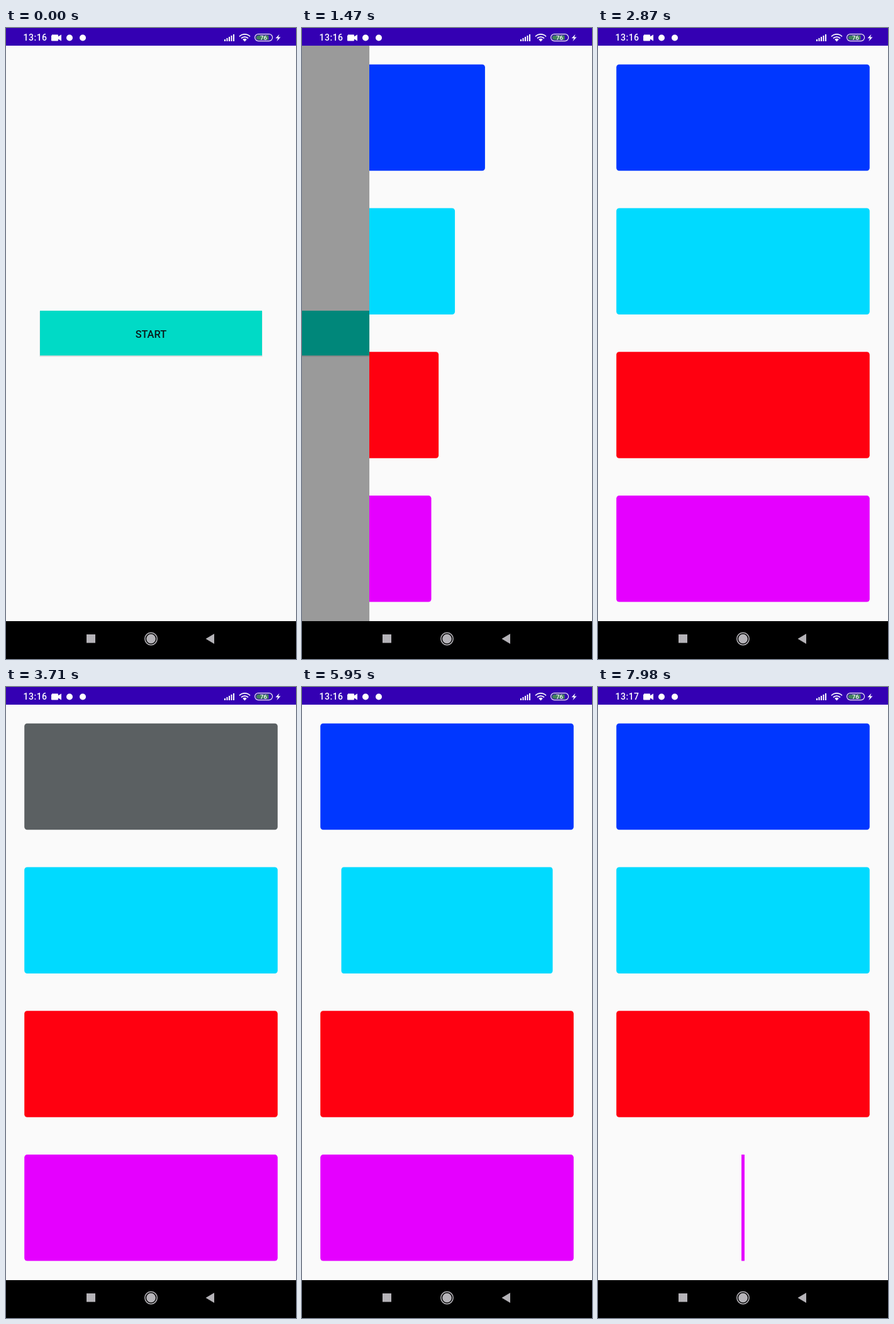
An HTML page for the animation above (8 s loop, 461 by 1000 pixels).

```html
<!DOCTYPE html>
<html lang="en">
<head>
<meta charset="utf-8">
<title>Card flip</title>
<style>
  html, body { margin: 0; width: 100%; height: 100%; overflow: hidden; background: #fafafa; }
  svg { display: block; overflow: hidden; font-family: Roboto, sans-serif; }
</style>
</head>
<body>
<svg width="461" height="1000" viewBox="0 0 461 1000">
  <g id="home">
    <rect width="461" height="1000" fill="#fafafa"/>
    <rect x="53.5" y="449" width="354" height="72" fill="#000" opacity=".12"/>
    <rect x="54" y="448" width="353" height="71" fill="#00dac6"/>
    <text x="230.5" y="491" font-size="16.4" font-weight="500" text-anchor="middle" fill="#0a1a1a">START</text>
  </g>
  <rect id="dim" y="28" width="461" height="912"/>
  <svg id="page" width="461" height="1000"><rect width="461" height="1000" fill="#fafafa"/></svg>

  <rect width="461" height="28" fill="#3400b3"/>
  <g fill="#fff">
    <text id="clock" x="27.5" y="20.3" font-size="14" font-weight="500" letter-spacing=".5"></text>
    <path d="M73 10.5h9q1 0 1 1v2l5-3v10l-5-3v2q0 1-1 1h-9q-1 0-1-1v-7q0-1 1-1z"/>
    <circle cx="101" cy="15.5" r="5"/>
    <circle cx="122" cy="15.5" r="5"/>
    <path d="M347 18h2v3h-2zM350.5 16h2v5h-2zM354 14h2v7h-2zM357.5 12h2v9h-2zM361 10h2v11h-2z"/>
    <path d="M376.3 18.2a4.5 4.5 0 0 1 6.4 0l-3.2 3.3z"/>
    <path d="M434.5 10l-6 6.3h3.7l-1.7 4.7 6-6.5h-3.7z"/>
  </g>
  <path d="M371 13.5a12 12 0 0 1 17 0M374 16.3a7.8 7.8 0 0 1 11 0" fill="none" stroke="#fff" stroke-width="1.7"/>
  <rect x="395.6" y="9.6" width="28" height="11" rx="5.5" fill="none" stroke="#eee" stroke-width="1.2"/>
  <path d="M403 11.5h14.5v7.500h-14.5q-5.5 0-5.5-3.75t5.5-3.75z" fill="#42805f"/>
  <text x="409.5" y="18.8" font-size="9.5" font-weight="500" text-anchor="middle" fill="#fff">76</text>

  <rect y="940" width="461" height="60"/>
  <g fill="#b5b3b8">
    <path d="M128 961h14v13.5h-14zM317.5 968l13.5-8v16z"/>
    <circle cx="230.5" cy="968" r="7.4"/>
    <circle cx="230.5" cy="968" r="9.7" fill="none" stroke="#b5b3b8" stroke-width="1.5"/>
  </g>
</svg>
<script>
const LOOP = 8000, STEP = 70, WIDTH = 461;
const OPEN_AT = 1211, OPEN_TIME = 500, SLIDE_AT = 1202, HALF_FLIP = 300;
const BACK = '#5b6062';
const cards = [
  { color: '#0037ff', slide: 580, flips: [3070, 3870] },
  { color: '#00daff', slide: 748, flips: [4675, 5430] },
  { color: '#ff0010', slide: 887, flips: [6160, 6930] },
  { color: '#e500ff', slide: 968, flips: [7713] }
];

const $ = id => document.getElementById(id);
const home = $('home'), dim = $('dim'), page = $('page'), clock = $('clock');
const progress = (t, start, length) => Math.min(1, Math.max(0, (t - start) / length));
const setAll = (el, attrs) => Object.entries(attrs).forEach(([k, v]) => el.setAttribute(k, v));

cards.forEach((card, i) => {
  card.el = document.createElementNS('http://www.w3.org/2000/svg', 'rect');
  setAll(card.el, { x: -201.3, y: 57.7 + 227.8 * i, width: 402.6, height: 168.5, rx: 4.5 });
  page.append(card.el);
});

// Shrink to an edge, swap the face, then grow again.
function flipState(t, flips) {
  let scale = 1, back = false;
  for (const start of flips) {
    if (t < start) break;
    const shrink = progress(t, start, HALF_FLIP);
    const grow = progress(t, start + HALF_FLIP, HALF_FLIP);
    if (shrink === 1) back = !back;
    scale = shrink < 1 ? (1 - shrink) ** 2 : (1 - Math.cos(Math.PI * grow)) / 2;
  }
  return { scale, back };
}

function draw(t) {
  const open = 1 - (1 - progress(t, OPEN_AT, OPEN_TIME)) ** 2;
  setAll(home, { transform: `translate(${-WIDTH * open / 4})` });
  setAll(dim, { opacity: open / 2 });
  setAll(page, { x: WIDTH * (1 - open) });
  clock.textContent = t < 7400 ? '13:16' : '13:17';

  for (const card of cards) {
    const x = WIDTH / 2 - WIDTH * (1 - progress(t, SLIDE_AT, card.slide));
    const { scale, back } = flipState(t, card.flips);
    setAll(card.el, {
      transform: `translate(${x}) scale(${scale} 1)`,
      fill: back ? BACK : card.color
    });
  }
}

function tick() {
  const t = performance.now() % LOOP;
  draw(Math.floor(t / STEP) * STEP);
  requestAnimationFrame(tick);
}
tick();
</script>
</body>
</html>
```
